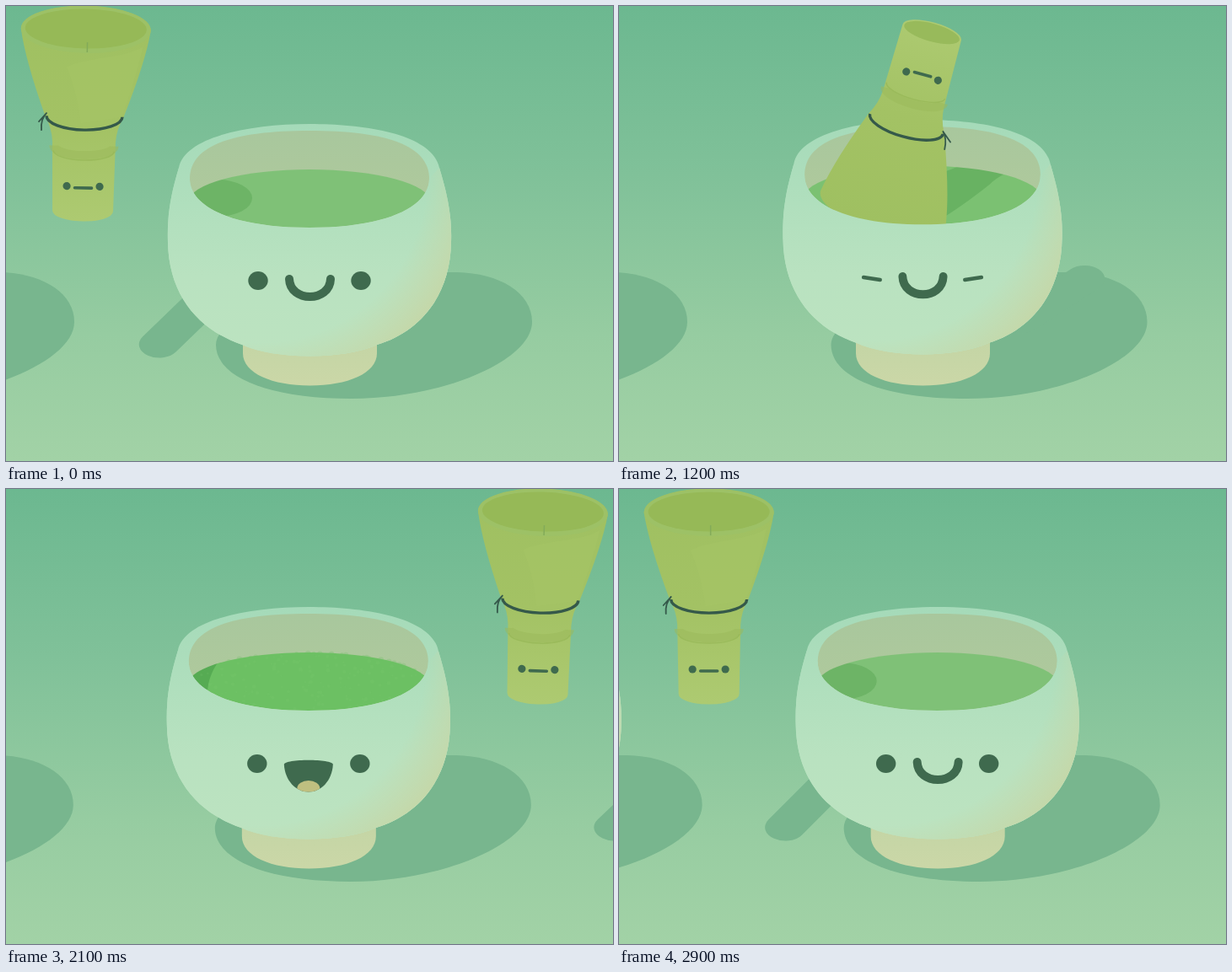
An HTML page that plays this animation: 720 by 540 pixels, repeating every 3 s.

```html
<!DOCTYPE html>
<html lang="en">
<head>
<meta charset="utf-8">
<title>Matcha bowl</title>
<style>
html, body { margin: 0; width: 100%; height: 100%; overflow: hidden; background: #8dc89e; }
svg { display: block; width: 720px; height: 540px; }
</style>
</head>
<body>
<svg viewBox="0 0 720 540" xmlns="http://www.w3.org/2000/svg">
  <defs>
    <linearGradient id="sky" x1="0" y1="0" x2="0" y2="1">
      <stop offset="0" stop-color="#6cb890"/><stop offset=".37" stop-color="#80c199"/>
      <stop offset=".72" stop-color="#96cca1"/><stop offset="1" stop-color="#a2d2a6"/>
    </linearGradient>
    <linearGradient id="clay" gradientUnits="userSpaceOnUse" x1="0" y1="140" x2="0" y2="416">
      <stop offset="0" stop-color="#a5dab9"/><stop offset=".35" stop-color="#b0dfbd"/>
      <stop offset=".65" stop-color="#b9e2c0"/><stop offset="1" stop-color="#bce3c0"/>
    </linearGradient>
    <radialGradient id="tan" gradientUnits="userSpaceOnUse" cx="300" cy="200" r="256">
      <stop offset=".78" stop-color="#c4d8aa" stop-opacity="0"/><stop offset="1" stop-color="#c4d8aa"/>
    </radialGradient>
    <linearGradient id="inner" x1="0" y1="0" x2="0" y2="1">
      <stop offset="0" stop-color="#a8c79d"/><stop offset="1" stop-color="#b2ca9c"/>
    </linearGradient>
    <linearGradient id="foot" x1="0" y1="0" x2="0" y2="1">
      <stop offset="0" stop-color="#c3d5a5"/><stop offset="1" stop-color="#cbd7a7"/>
    </linearGradient>
    <linearGradient id="bamboo" x1="0" y1="0" x2="0" y2="1">
      <stop offset="0" stop-color="#9fc061"/><stop offset=".55" stop-color="#a3c264"/>
      <stop offset="1" stop-color="#adca71"/>
    </linearGradient>
    <clipPath id="open"><path id="openPath"/></clipPath>
    <clipPath id="tea"><ellipse cx="360" cy="232" rx="143" ry="38" clip-path="url(#open)"/></clipPath>
  </defs>
  <rect width="720" height="540" fill="url(#sky)"/>
  <g id="scene"></g>
</svg>
<script>
const LOOP = 3000, GAP = 543, INK = '#3f6a4e', SHADE = '#78b68e';
const scene = document.getElementById('scene');

const RIM_LOW = 'C502 238 452 263 360 263C268 263 218 238 218 205';
const OPEN = 'M218 205C218 165 270 148 360 148C450 148 502 165 502 205' + RIM_LOW + 'Z';
const SIDES = 'C524 225 529 250 528 280C527 345 490 387 440 402C400 420 320 420 280 402' +
  'C230 385 193 345 192 280C191 250 195 225 205 192';
const BODY = 'M205 192C212 155 290 140 360 140C430 140 506 153 514 192' + SIDES + 'Z';
const FRONT = 'M218 205L205 192C195 225 191 250 192 280C193 345 230 385 280 402' +
  'C320 420 400 420 440 402C490 387 527 345 528 280C529 250 524 225 514 192L502 205' + RIM_LOW + 'Z';
document.getElementById('openPath').setAttribute('d', OPEN);

// Whisk path: time, x and y of the binding, rotation
const KEYS = [
  [-100, 90, 131, 0], [0, 93, 131, 1], [150, 125, 118, 15], [350, 245, 62, 80],
  [500, 335, 55, 130], [600, 372, 110, 155], [700, 384, 182, 162.5], [867, 341, 142, 195.5],
  [1033, 384, 180, 163], [1200, 341, 140, 195.5], [1350, 375, 150, 180], [1530, 392, 100, 228],
  [1700, 408, 108, 272.5], [1850, 510, 108, 320], [2000, 620, 128, 357], [2100, 635, 131, 361.7],
  [2300, 634, 131, 360], [2600, 633, 131, 360], [2900, 632, 131, 360], [3000, 636, 131, 361],
  [3150, 668, 118, 375]
];

const clamp = v => Math.max(0, Math.min(1, v));
const ramp = (t, a, b) => clamp((t - a) / (b - a));
const smooth = u => u * u * (3 - 2 * u);
const lerp = (a, b, u) => a + (b - a) * u;
const mix = (a, b, u) => `rgb(${a.map((v, i) => Math.round(lerp(v, b[i], u)))})`;

function pose(t) {
  let i = 1;
  while (i < KEYS.length - 3 && KEYS[i + 1][0] <= t) i++;
  const [p, a, b, n] = KEYS.slice(i - 1, i + 3);
  const h = b[0] - a[0], u = (t - a[0]) / h, w = 1 - u;
  return [1, 2, 3].map(j => {
    const ma = (b[j] - p[j]) / (b[0] - p[0]) * h;
    const mb = (n[j] - a[j]) / (n[0] - a[0]) * h;
    return (1 + 2 * u) * w * w * a[j] + u * w * w * ma + u * u * (3 - 2 * u) * b[j] - u * u * w * mb;
  });
}

let seed = 7;
const rnd = () => (seed = (seed * 16807) % 2147483647) / 2147483647;
const dot = (a, rx, ry, y, r) =>
  `<circle cx="${(360 + rx * Math.cos(a)).toFixed(1)}" cy="${(y + ry * Math.sin(a)).toFixed(1)}" r="${r.toFixed(1)}"/>`;
const bubbles = Array.from({ length: 150 }, () => {
  const r = Math.sqrt(rnd());
  return dot(rnd() * 6.283, 136 * r, 33 * r, 230, .8 + 1.6 * rnd());
}).join('');
const bumps = Array.from({ length: 26 }, () => dot(Math.PI * (1.1 + .8 * rnd()), 141, 37, 232, 1.5 + 2 * rnd())).join('');

const at = (x, s) => `<g transform="translate(${x.toFixed(2)} 0)">${s}</g>`;
const squash = (b, s) =>
  `<g transform="translate(360 ${416 + 2 * b}) scale(${1 + .015 * b} ${1 - .011 * b}) translate(-360 -416)">${s}</g>`;

const bowlShade = b => `<path transform="translate(${-2.5 * b} 0)" fill="${SHADE}" d="M249 402C249 360 400 316 470 316
  L535 316C585 317 624 340 624 375C624 420 520 466 410 466C310 466 249 440 249 402Z"/>`;

function bowlBack(s, shade) {
  const base = mix([127, 193, 119], [108, 192, 99], s.mix);
  const dark = mix([109, 180, 102], [86, 171, 83], s.mix);
  return `<path fill="url(#foot)" d="M281 395V412C281 436 316 450.500 360.500 450.500C405 450.500 440 436 440 412V395Z"/>` + squash(s.bob,
    `<path d="${BODY}" fill="url(#clay)"/><path d="${OPEN}" fill="url(#inner)"/>
    <g fill="${base}" opacity="${s.foam}">${bumps}</g>
    <g clip-path="url(#tea)"><rect x="200" y="180" width="320" height="90" fill="${base}"/>
    <path d="M210 190H265C252 205 240 220 240 245H210Z" fill="${dark}" opacity="${s.edge}"/>
    <g fill="#85cf7b" opacity="${s.foam * .5}">${bubbles}</g><g fill="${dark}">${shade}</g></g>`);
}

function face(s) {
  const eyes = [-1, 1].map(d => s.eye > .15
    ? `<ellipse cx="${360 + 61 * d}" cy="326" rx="11.7" ry="${11 * s.eye}" fill="${INK}"/>`
    : `<path d="M${360 + 71 * d} 325L${360 + 51 * d} 328" stroke="${INK}" stroke-width="4.5" stroke-linecap="round"/>`).join('');
  if (!s.mouth) return eyes +
    `<path d="M336 324C337 352 384 352 385 324" fill="none" stroke="${INK}" stroke-width="10" stroke-linecap="round"/>`;
  const lips = 'M331 327C331 320 389 320 389 327C388 346 375 359.500 360 359.500C345 359.500 332 346 331 327Z';
  return eyes + `<g transform="translate(0 322) scale(1 ${s.mouth}) translate(0 -322)">
    <clipPath id="lips"><path d="${lips}"/></clipPath><path d="${lips}" fill="${INK}"/>
    <ellipse cx="360" cy="${s.tongue}" rx="13.5" ry="9.5" fill="#bfbf80" clip-path="url(#lips)"/></g>`;
}

const bowlFront = s => squash(s.bob,
  `<path d="${FRONT}" fill="url(#clay)"/><path d="${FRONT}" fill="url(#tan)"/>` + face(s));

function whiskShape(c, k) {
  const top = -103 * k, end = 112 * k;
  return `M-75.500 ${top}C-72 ${-80 * k} -60 ${-40 * k} -45 0Q-37 ${14 * k} -36 ${30 * k}L-34.500 ${end}
    A34.500 ${11 * Math.abs(c) + .1} 0 0 0 34.500 ${end}L36 ${30 * k}Q37 ${14 * k} 45 0
    C60 ${-40 * k} 72 ${-80 * k} 75.500 ${top}A75.500 ${Math.max(4, 27 * Math.abs(c))} 0 0 0 -75.500 ${top}Z`;
}

function whisk(x, y, deg, c, k, shape) {
  const a = deg * Math.PI / 180, top = -103 * k, end = 112 * k, ac = Math.abs(c);
  const arc = (r, yy, ry) => `M${-r} ${yy}A${r} ${ry * ac + .1} 0 0 ${c > 0 ? 0 : 1} ${r} ${yy}`;
  const ux = -Math.cos(a), uy = -Math.sin(a), kx = x + 45 * ux, ky = y + 45 * uy;
  let ends = '';
  if (c > 0) ends = `<path d="M-22 ${-58 * k}C0 ${-70 * k} 50 ${-70 * k} 68 ${-84 * k}C58 -40 50 -15 44 0L-4 8Q-10 -32 -22 ${-58 * k}Z" fill="#a6c566" opacity="${.55 * c}"/>
    <ellipse cy="${top}" rx="77" ry="${28 * c}" fill="#9dc166"/>
    <ellipse cy="${top - c}" rx="72" ry="${23.5 * c}" fill="#96b957"/>
    <path d="M2 ${top + 15 * c}V${top + 27 * c}" stroke="#83ab59" stroke-width="1.5"/>`;
  else ends = `<ellipse cy="${end}" rx="34" ry="${11 * ac}" fill="#98ba5b"/>`;
  const fx = -10 * Math.max(0, -Math.sin(a)), fy = 72 * k + 12 * c;
  return `<g transform="translate(${x} ${y}) rotate(${deg})" fill="none">
    <path d="${shape}" fill="url(#bamboo)" stroke="url(#bamboo)" stroke-width="3" stroke-linejoin="round"/>${ends}
    <path d="${arc(36, 35 * k, 11)}" stroke="#9bba5b" stroke-width="10" opacity=".55"/>
    <path d="${arc(36, 41 * k, 11)}" stroke="#98b858" stroke-width="1.5" opacity=".8"/>
    <path d="${arc(45, 0, 16)}" stroke="#35594a" stroke-width="3.4"/>
    <g transform="translate(${fx} ${fy})" fill="${INK}">
      <circle cx="-19.500" cy="-1" r="4.600"/><circle cx="19.500" cy="-1" r="4.600"/>
      <path d="M-10 1H10" stroke="${INK}" stroke-width="3.600" stroke-linecap="round"/></g></g>
    <path d="M${kx} ${ky - 3}l${9 * ux} ${9 * uy + 10}M${kx} ${ky - 3}q${6 * ux - 1} ${6 * uy + 7} ${4 * ux - 2} ${4 * uy + 20}"
      fill="none" stroke="#35594a" stroke-width="1.800" stroke-linecap="round"/>`;
}

// Handle shadow: a flattened capsule from the binding to the end of the handle
function whiskShade(x, y, deg, c, k) {
  const a = deg * Math.PI / 180, flat = 1.5;
  const ground = d => {
    const px = x - Math.sin(a) * d, py = y + Math.cos(a) * d;
    return `${(px - .5 * py + 206) / flat} ${.5 * py + 286 + 17 * Math.max(0, -c)}`;
  };
  return `<path transform="scale(${flat} 1)" d="M${ground(0)}L${ground(100 * k)}" stroke="${SHADE}" stroke-width="32" stroke-linecap="round"/>`;
}

function draw(t) {
  const scroll = -GAP * smooth(ramp(t, 2075, LOOP));
  const [x, y, deg] = pose(t);
  const c = Math.cos(deg * Math.PI / 180), k = 1 + .07 * (1 - c * c);
  const shape = whiskShape(c, k);

  const stir = ramp(t, 600, 700) * (1 - ramp(t, 1300, 1500));
  const fresh = { mix: 0, foam: 0, edge: 0, bob: 0, eye: 1, mouth: 0, tongue: 362 };
  const done = { ...fresh, mix: 1, edge: 1, mouth: 1, tongue: 355.5 };
  const now = {
    mix: smooth(ramp(t, 1000, 1650)),
    foam: ramp(t, 1200, 1600) * (1 - ramp(t, 1800, 2200)),
    edge: ramp(t, 1800, 2000),
    bob: stir * Math.cos((t - 700) / 500 * 3 * Math.PI),
    eye: 1 - ramp(t, 350, 450) + ramp(t, 1380, 1480),
    mouth: t < 1450 ? 0 : lerp(.35, 1, ramp(t, 1450, 1600)),
    tongue: lerp(361, 355.5, ramp(t, 1700, 2000))
  };

  const blob = dx => `<ellipse cx="${x + 157 - dx}" cy="228" rx="42" ry="22"`;
  const u = smooth(ramp(t, 1350, 1600));
  const plane = [1, 0, lerp(-.6, 0, u), lerp(.4, .35, u), lerp(148, 50, u), lerp(155, 180, u)];
  const cast = `<g transform="matrix(${plane})"><path transform="translate(${x} ${y}) rotate(${deg})" d="${shape}"/></g>`;
  const teaShade = blob(0) + ` opacity="${1 - ramp(t, 200, 400)}"/>` + (t < 1950 ? cast : '');

  const bowls = [[-GAP, done, ''], [0, now, teaShade], [GAP, fresh, t > 2000 ? blob(GAP) + '/>' : '']];
  const each = f => bowls.map(([dx, s, shade]) => at(dx, f(s, shade))).join('');
  scene.innerHTML = at(scroll,
    each(s => bowlShade(s.bob)) + whiskShade(x, y, deg, c, k) +
    each(bowlBack) + whisk(x, y, deg, c, k, shape) + each(bowlFront));
}

// The picture advances ten times a second
let start, last;
function tick(ts) {
  start ??= ts;
  const t = Math.floor((ts - start) % LOOP / 100) * 100;
  if (t !== last) draw(last = t);
  requestAnimationFrame(tick);
}
draw(0);
requestAnimationFrame(tick);
</script>
</body>
</html>
```
